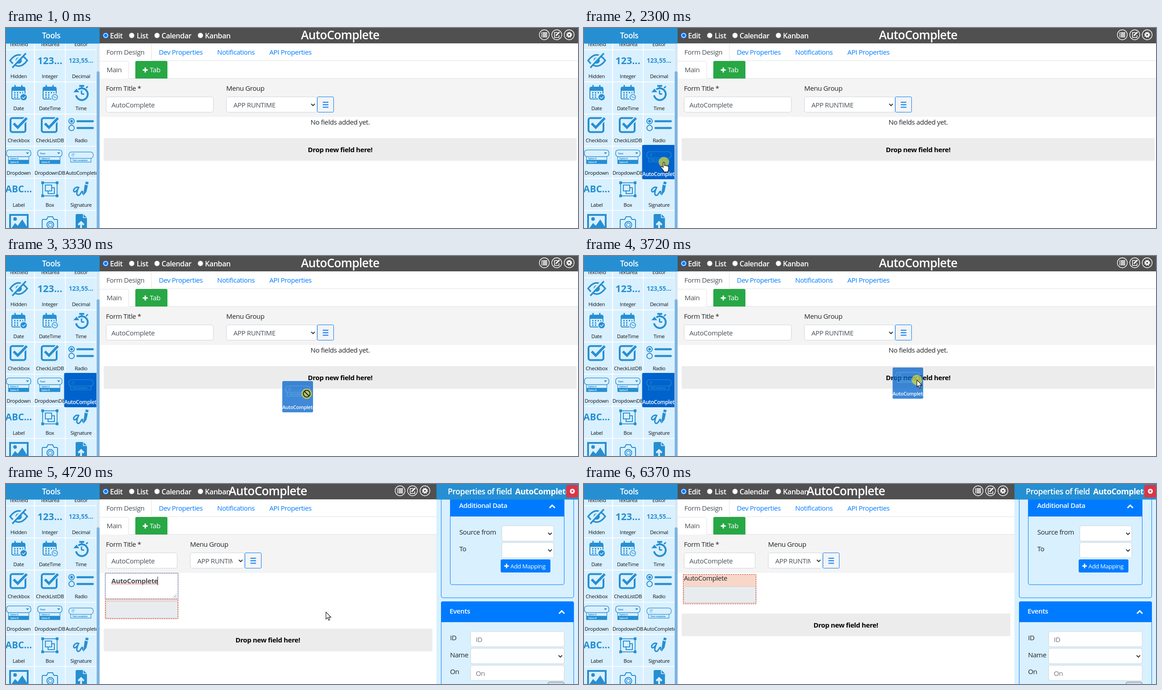
These frames come from a looping animation (1265x443 px, 6.5 s). An HTML page:

```html
<!DOCTYPE html>
<html lang="en">
<head>
<meta charset="utf-8">
<title>Form designer</title>
<style>
html, body { margin: 0; width: 100%; height: 100%; overflow: hidden; background: #fff; }
svg { display: block; }
body > svg { width: 1265px; height: 443px; }
text { font-family: "Open Sans", "Noto Sans", sans-serif; letter-spacing: -.027em; white-space: pre; }
.mid { text-anchor: middle; }
.semi { font-weight: 600; }
.bold { font-weight: 700; }
.ico { fill: none; stroke: #268fd2; stroke-width: 2; }
.ico .f, .ico text { fill: #268fd2; stroke: none; }
.ico .bg { fill: #d9f0ff; }
</style>
</head>
<body>
<svg id="stage" viewBox="0 0 1265 443" xmlns="http://www.w3.org/2000/svg"></svg>
<script>
const LOOP = 6500, STEP = 68, START = 330;
const BLUE = '#007bff', SKY = '#268fd2', PALE = '#d9f0ff', INK = '#212529', GREY = '#495057', LINE = '#ced4da';

const text = (x, y, s, size = 15, fill = INK, cls = '') =>
  `<text x="${x}" y="${y}" font-size="${size}" fill="${fill}" class="${cls}">${s}</text>`;
const rect = (x, y, w, h, fill, r = 0, more = '') =>
  `<rect x="${x}" y="${y}" width="${w}" height="${h}" rx="${r}" fill="${fill}" ${more}/>`;
const box = (x, y, w, h, stroke = LINE, fill = '#fff', r = 4) =>
  rect(x + .5, y + .5, w - 1, h - 1, fill, r, `stroke="${stroke}"`);
const path = (d, stroke, w = 2, fill = 'none') =>
  `<path d="${d}" stroke="${stroke}" stroke-width="${w}" fill="${fill}"/>`;
const group = (id, s) => `<g id="${id}">${s}</g>`;
const at = (x, y, s) => `<g transform="translate(${x} ${y})">${s}</g>`;
const clip = (x, y, w, h, s) =>
  `<svg x="${x}" y="${y}" width="${w}" height="${h}" viewBox="${x} ${y} ${w} ${h}">${s}</svg>`;
const plus = (x, y, r) => path(`M${x - r} ${y}h${2 * r}M${x} ${y - r}v${2 * r}`, '#fff', r * .55);
const caret = (x, y) => path(`M${x - 4} ${y - 2}l4 4 4-4`, '#343a40');
const select = (x, y, w) => box(x, y, w, 35) + caret(x + w - 9, y + 18);

// Tool icons, drawn from the centre of each tile's picture area
const calendar = badge => `
  <rect x="-15" y="-12" width="29" height="26" rx="3"/>
  <path class="f" d="M-15-9q0-4 4-4h21q4 0 4 4v5h-29z"/>
  <path d="M-8-17v7M7-17v7" stroke-width="3"/>
  <path d="M-10 0h20M-10 5h12M-10 10h10" stroke-width="3" stroke-dasharray="3 3"/>
  <circle class="bg" cx="11" cy="10" r="8.5" stroke="none"/>${badge}`;
const checkbox = `<rect x="-18" y="-15" width="33" height="31" rx="4" stroke-width="4"/>
  <path d="M-11-3l9 9L18-15" stroke="${PALE}" stroke-width="10"/>
  <path d="M-11-3l9 9L18-15" stroke-width="5.5"/>`;
const dropdown = label => `
  <rect x="-27" y="-15.500" width="54" height="15" rx="6" stroke-width="1.4"/>
  <path class="f" d="M16-10h7l-3.500 4z"/>
  <rect class="bg" x="-22.500" y="-.5" width="45" height="15" stroke-width="1.2"/>
  <rect class="f" x="-22.500" y="6.500" width="45" height="9"/>
  <text x="-22" y="-5.500" font-size="6" font-weight="700">${label}</text>
  <text x="-19" y="5" font-size="4.500" font-weight="700">Option A</text>
  <text x="-19" y="13" font-size="4.500" font-weight="700" style="fill:${PALE}">Option B</text>`;
const suggest = `
  <rect x="-27" y="-11" width="54" height="14" rx="6" stroke-width="1.200"/>
  <path d="M-23 3V11.500H22V3" stroke-width="1.200"/>
  <text x="-21" y="-.5" font-size="9">IT</text>
  <text x="-19" y="9" font-size="5" font-weight="700">Text complete</text>`;
const digits = (s, size, y) =>
  `<text class="mid" y="${y}" font-size="${size}" font-weight="700" style="letter-spacing:0">${s}</text>`;

const icons = {
  Hidden: `<path d="M-19 0Q0-25 19 0Q0 25-19 0Z" stroke-width="3.500"/>
    <circle r="7" class="f"/><path d="M-3-2q1-3 4-3" stroke="${PALE}"/>
    <path d="M13-18L-17 14" stroke="${PALE}" stroke-width="4"/>
    <path d="M16-16L-14 16" stroke-width="3.500"/>`,
  Integer: digits('123...', 21.5, 8),
  Decimal: digits('123,55...', 13.6, 4.5),
  Date: calendar('<circle class="f" cx="11" cy="10" r="7"/><path d="M7.500 10l3 3 4.500-5" stroke="#d9f0ff" stroke-width="1.500"/>'),
  DateTime: calendar('<circle cx="11" cy="10" r="6" stroke-width="1.500"/><path d="M8 8l3 2.500h4" stroke-width="1.300"/>'),
  Time: `<path d="M-11 6A13 13 0 1 0-6-7" stroke-width="4"/><path class="f" d="M-17-1L-10-9-4-1zM-4-17H7v4H-4z"/>
    <path d="M1.500-14v5M11-10l4-4M1 3V-5M1 3h6" stroke-width="3"/>`,
  Checkbox: checkbox,
  CheckListDB: checkbox,
  Radio: `<circle cx="-21" cy="-8" r="6"/><circle class="f" cx="-21" cy="-8" r="3"/>
    <circle cx="-21" cy="7" r="6"/><path d="M-8-8H26M-8 7H26" stroke-width="4.500" stroke-linecap="round"/>`,
  Dropdown: dropdown('&#160;'),
  DropdownDB: dropdown('Text'),
  AutoComplete: suggest,
  Label: digits('ABC...', 20.5, 7.5),
  Box: `<rect x="-16" y="-14" width="32" height="29" stroke-width="1.800"/>
    <path class="f" d="M-19-17h6v6h-6zM13-17h6v6h-6zM-19 12h6v6h-6zM13 12h6v6h-6z"/>
    <rect x="-10" y="-9" width="14" height="13"/><path d="M4-3h6V10H-4V4"/>`,
  Signature: `<path d="M-4-3c-6-4-14 3-12 8 3 4 9-4 11-9-4 7-7 18-1 18 6-1 6-10 9-9 2 1-1 5 2 6" stroke-width="3"/>
    <path class="f" d="M11-17l6 2-2 5-6-2zM8-10l7 2-3 14-7 9 1-10z"/>`,
  Image: `<rect x="-19" y="-14" width="39" height="36" stroke-width="4"/>
    <circle class="f" cx="-8" cy="-5" r="4"/><path class="f" d="M-17 17L-8 4l6 6L8-4 18 12v8h-35z"/>`,
  Camera: `<path d="M-15-4h8l3-6H6l3 6h6q2 0 2 3v24h-34V-1q0-3 2-3z"/><circle cx="1" cy="8" r="7.500"/><circle cx="1" cy="8" r="4" stroke-width="1.500"/>`,
  File: `<path class="f" d="M-12-13q0-3 3-3H5l8 8v30h-25z"/><path d="M5-16v8h8" stroke="${PALE}" stroke-width="1.500"/>
    <path d="M0 17V4M-6 8l6-6 6 6" stroke="${PALE}" stroke-width="4"/>`
};
const icon = (name, x, y) => `<g class="ico" transform="translate(${x} ${y})">${icons[name] || ''}</g>`;

const names = ['Textfield', 'Textarea', 'Editor', ...Object.keys(icons)];
const cols = [[-6, 68, 28], [64, 66.5, 97], [132, 67.5, 166]];
function tool(name, i) {
  const [x, w, c] = cols[i % 3], y = 49 + 71.2 * (Math.floor(i / 3) - 1);
  const label = name === 'AutoComplete' ? text(132, y + 62, name, 11.25, '#111')
    : text(c, y + 62, name, 11.25, '#111', 'mid');
  return rect(x, y, w, 69.6, PALE, 2) + icon(name, c, y + 23) + label;
}
const sidebar = rect(0, 0, 207, 443, '#fff') + clip(0, 34, 200, 409, names.map(tool).join('')) +
  rect(200, 34, 7, 409, '#d6e9f5') + rect(200.5, 96, 6.5, 360, '#7db4e2', 3) +
  rect(0, 0, 207, 34.5, SKY) + text(100, 22.5, 'Tools', 17.2, '#fff', 'mid semi');
const hotTile = clip(128, 258, 72, 78, rect(128.5, 259, 75, 76, '#0062cc', 3) +
  icon('AutoComplete', 166, 285) + text(129, 328, 'AutoComplete', 11.7, '#fff', 'semi'));

const radio = (x, tx, s, on) =>
  `<circle cx="${x}" cy="16.500" r="6" fill="#fff" stroke="${on ? '#0075ff' : '#767676'}" stroke-width="${on ? 1.6 : 1}"/>` +
  (on ? `<circle cx="${x}" cy="16.500" r="3.700" fill="#0075ff"/>` : '') +
  text(tx, 22.5, s, 16, '#fff', 'semi');
const round = (x, s) => at(x, 15, `<circle r="11" fill="none" stroke="#fff" stroke-width="1.300"/>${s}`);
const headIcons = d =>
  round(1190.5 - d, path('M-6.500-4.500h2M-6.500-1.500h2M-6.500 1.500h2M-6.500 4.500h2M-3.500-4.500h10M-3.500-1.500h10M-3.500 1.500h10M-3.500 4.500h10', '#fff', 2)) +
  round(1218 - d, path('M2-5H-5V6H5V1', '#fff', 1.5) + path('M-2 2L6-6', '#fff', 3)) +
  round(1245.5 - d, `<circle r="3.600" fill="none" stroke="#fff" stroke-width="3"/>
    <circle r="5.500" fill="none" stroke="#fff" stroke-width="2" stroke-dasharray="2.300 2.020"/>`);

// d is the width given up to the properties panel
function form(d) {
  const right = d ? 952 : 1265, h = d / 4, x = 487 - Math.round(h), w = 201 - Math.round(h);
  const c = 739 - Math.round(d / 2);
  return rect(207, 0, right - 207, 443, '#fff') + rect(207, 0, right - 207, 34, '#505050') +
    radio(220.5, 230, 'Edit', 1) + radio(278, 289, 'List') + radio(334, 344, 'Calendar') + radio(430, 440, 'Kanban') +
    text(c, 25, 'AutoComplete', 26.2, '#fff', 'mid semi') + headIcons(d) +
    path(`M321.500 34V68.500Q321.500 72.500 325 72.500H${right}`, '#dee2e6', 1) +
    text(222, 59, 'Form Design', 15, GREY) +
    [[338, 'Dev Properties'], [467, 'Notifications'], [582.5, 'API Properties']].map(([tx, s]) => text(tx, 59, s, 15, BLUE)).join('') +
    rect(207, 112, right - 207, 85, '#f4f4f4') +
    path(`M207 73.500H267.500Q271.500 73.500 271.500 77.500V111.500H${right}`, '#dee2e6', 1) +
    text(222.5, 98, 'Main', 15, GREY) +
    path('M286 112V76q0-3 3-3h65q3 0 3 3v36z', 'none', 0, '#28a745') + plus(308, 93, 5.5) + text(318, 98, 'Tab', 15, '#fff') +
    text(221, 138.5, 'Form Title *') + box(221, 152, 238 - Math.round(h), 35) + text(233, 176, 'AutoComplete', 15, GREY) +
    text(x, 138.5, 'Menu Group') + select(x, 152, w) +
    clip(x + 16, 155, d ? 78 : 120, 30, text(x + 16, 176, 'APP RUNTIME', 15, GREY)) +
    box(x + w, 152, 37, 35, BLUE, '#f4f4f4', 2) +
    path([164.5, 170, 175.5].map(y => `M${x + w + 12.5} ${y}h12.500`).join(''), BLUE, 2);
}
const dropZone = (y, d) => rect(216, y, 1046 - d, 50, '#ececec') +
  text(739 - Math.round(d / 2), y + 30.5, 'Drop new field here!', 15, '#000', 'mid bold');

const chevron = (x, y) => path(`M${x - 6} ${y + 3}l6-6 6 6`, '#fff', 3);
const dashed = (x, y, w, h, fill, stroke, more = '') =>
  rect(x + .5, y + .5, w - 1, h - 1, fill, 0, `stroke="${stroke}" stroke-dasharray="3 2" ${more}`);
const panel = rect(952, 0, 313, 443, PALE) +
  path('M962.500 34V248q0 4 4 4H1251.500q4 0 4-4V34', BLUE, 1) +
  path('M982.500 70V219q0 4 4 4H1230.500q4 0 4-4V70', BLUE, 1) +
  rect(982, 34, 253, 38, BLUE) + text(1002, 53, 'Additional Data', 15, '#fff', 'semi') + chevron(1208, 50) +
  text(1002.5, 112, 'Source from') + select(1096, 92, 116) +
  text(1002.5, 149, 'To') + select(1096, 129, 116) +
  rect(1094, 167, 110, 29, BLUE, 3) + plus(1107, 181.5, 5) + text(1115.5, 186.5, 'Add Mapping', 13.1, '#fff') +
  box(962, 260, 294, 200, BLUE, PALE) + path('M962 306V264q0-4 4-4h286q4 0 4 4v42z', 'none', 0, BLUE) +
  text(981, 287, 'Events', 15, '#fff', 'semi') + chevron(1229, 284) +
  text(982, 346, 'ID') + box(1027, 326, 208, 35) + text(1039, 349.5, 'ID', 15, '#6c757d') +
  text(982, 383.5, 'Name') + select(1027, 363.5, 208) +
  text(982, 421, 'On') + box(1027, 401, 208, 35) + text(1039, 424.5, 'On', 15, '#6c757d') +
  box(1198, 438, 37, 30, '#6c757d', '#d3dbe2') +
  rect(952, 0, 313, 34.5, SKY) + text(977, 22.5, 'Properties of field', 17.5, '#fff', 'semi') +
  clip(1120, 0, 119, 34, text(1126, 22.5, 'AutoComplete', 17.7, '#fff', 'bold')) +
  rect(1239, 2, 26, 28, '#dc3545', 3) + '<circle cx="1252.500" cy="16" r="5.500" fill="#fff"/>' +
  path('M1250.500 14l4 4M1254.500 14l-4 4', '#dc3545', 1.6);

let wave = 'M233 222.500';
for (let i = 0; i < 26; i++) wave += 'l2-2 2 2';
const editing = dashed(219, 197, 162, 102, '#f8d7ca', '#b5261e') + box(221, 260, 159, 37, LINE, '#e9ecef') +
  rect(219, 197, 162, 58, '#fff', 3) + dashed(219, 197, 162, 58, 'none', '#b5261e') +
  dashed(219, 197, 162, 58, 'none', '#80bdff', 'stroke-dashoffset="2.500" stroke-width="1.500"') +
  text(233, 220, 'AutoComplete', 15, GREY, 'bold') + path(wave, '#e8413a', 1) + path('M335.500 205v19', '#222', 1) +
  path('M370 252l7-7M374 252l3-3', '#777', 1) + dropZone(320.5, 319);
const placed = dashed(219, 200, 162, 66, '#f8d7ca', '#b5261e') + text(221, 214, 'AutoComplete') +
  box(221, 227, 159, 36, LINE, '#e9ecef') + dropZone(287, 319);

const arrow = path('M0 0V15.500L3.600 12.200 6 18 8.500 17 6.100 11.400H11Z', '#111', 1.1, '#fff');
const hand = path('M-1.500 1.500Q0-1 1.500 1.500V8Q3 6.500 4.500 8.300 6 7.200 7.500 9 9.500 8.200 10.500 10.500V15Q10.500 18 9 20V22H0V20L-5.500 13Q-7 10.500-5 9.800-3.500 9.500-1.500 12Z', '#111', 1.2, '#fff');
const banned = '<circle r="7.500" fill="none" stroke="#222" stroke-width="2"/>' + path('M-5.300-5.300L5.300 5.300', '#222', 2);
const ghostTile = `<g opacity=".75">${clip(0, 0, 68, 69.5, rect(0, 0, 68, 69.5, '#0062cc', 3) +
  icon('AutoComplete', 34, 22) + text(0, 62, 'AutoComplete', 11, '#fff', 'semi'))}</g>`;

document.getElementById('stage').innerHTML =
  group('before', form(0) + text(739, 214, 'No fields added yet.', 15, INK, 'mid') + dropZone(244, 0)) +
  group('after', form(319) + group('editing', editing) + group('placed', placed) + panel) +
  sidebar + group('hot', hotTile) + group('ghost', ghostTile) +
  group('pointer', '<circle id="ring" r="11.500" fill="#ebe128" fill-opacity=".65"/>' +
    group('arrow', arrow) + group('hand', hand) + group('banned', banned));

// Pointer stops: time, x, y
const route = [
  [330, 1199, 428], [540, 985, 376], [670, 791, 330], [800, 530, 292], [940, 320, 276], [1078, 281, 279],
  [1390, 200, 292], [1700, 181, 296], [2300, 176, 297], [2420, 205, 297], [2700, 340, 322], [2960, 476, 332],
  [3322, 665, 305], [3640, 735, 276], [3795, 744, 267], [4180, 744, 267],
  [4190, 722, 274.5], [4450, 722, 274.5], [4680, 707.5, 283.5], [4840, 718, 300],
  [5050, 852, 400], [5460, 1150, 446]
];
function locate(t) {
  let i = 0;
  while (i < route.length - 2 && t > route[i + 1][0]) i++;
  const [t0, x0, y0] = route[i], [t1, x1, y1] = route[i + 1];
  const k = Math.min(1, Math.max(0, (t - t0) / (t1 - t0)));
  return [x0 + (x1 - x0) * k, y0 + (y1 - y0) * k];
}

const $ = id => document.getElementById(id);
const show = (id, on) => { $(id).style.display = on ? '' : 'none'; };
const move = (id, x, y) => $(id).setAttribute('transform', `translate(${x} ${y})`);

function draw(t) {
  const q = t < START ? 0 : START + Math.floor((t - START) / STEP) * STEP;
  const [x, y] = locate(t >= 4190 && t < 4450 ? 4300 : q);
  const opened = t >= 4720, drag = t >= 2420 && t < 4190, overZone = drag && x > 600 && y < 294;
  const hot = t >= 1390 && !opened;
  show('before', !opened);
  show('after', opened);
  show('editing', t < 6370);
  show('placed', t >= 6370);
  show('hot', hot);
  show('ghost', drag);
  show('pointer', t >= START && t < 5460);
  show('ring', t >= 2230 && t < 4190);
  show('banned', drag && !overZone);
  show('hand', hot && !drag);
  show('arrow', !hot || overZone);
  move('pointer', x, y);
  move('ghost', x - 54, y - 28);
}

function tick() {
  draw(performance.now() % LOOP);
  requestAnimationFrame(tick);
}
tick();
</script>
</body>
</html>
```
